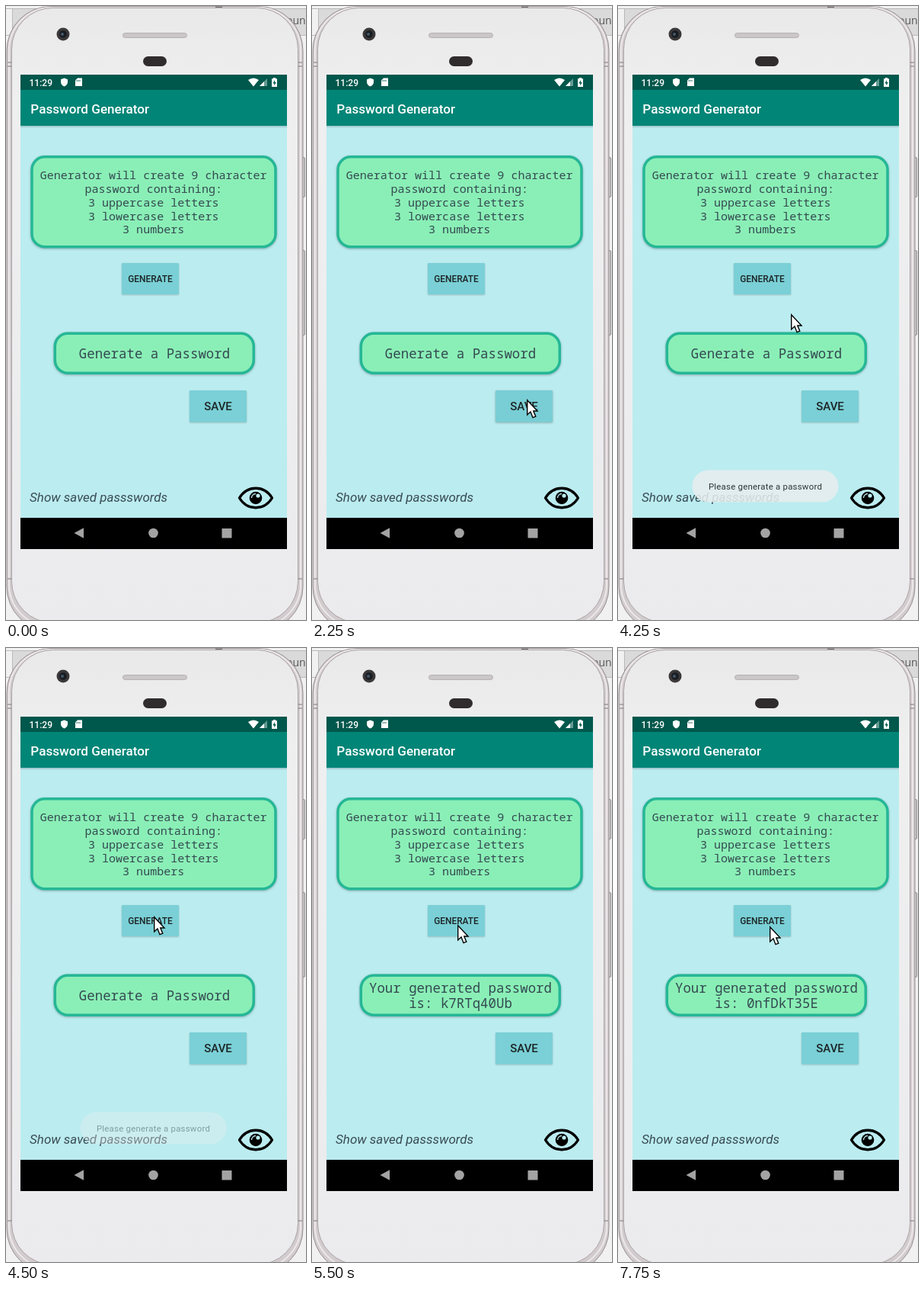
Animation of 394x805 px, one loop 8 s. Source, as an HTML page:

```html
<!DOCTYPE html>
<html lang="en">
<head>
<meta charset="utf-8">
<title>Password Generator</title>
<style>
  html, body { margin: 0; width: 100%; height: 100%; overflow: hidden; background: #f1f1f1; }
  svg { display: block; width: 394px; height: 805px; font-family: Roboto, sans-serif; }
  .mono { font-family: "Noto Sans Mono", monospace; text-anchor: middle; fill: #344a52; white-space: pre; }
  .info { font-size: 15.05px; }
  .result { font-size: 17.4px; }
  .panel { fill: #8aefb6; stroke: #25b796; stroke-width: 3.5; filter: drop-shadow(0 1px 1.5px #0004); }
  .button rect { fill: #7ad0d6; filter: drop-shadow(0 1px 1px #0003); }
  .button.pressed rect { fill: #78ced4; filter: drop-shadow(0 1px 1.5px #0004); }
  .button text { font-weight: 500; text-anchor: middle; fill: #1c2425; }
  #toast text { font-size: 11.4px; letter-spacing: .25px; text-anchor: middle; fill: #242829; }
</style>
</head>
<body>
<svg viewBox="0 0 394 805">
  <defs>
    <linearGradient id="body" x2="0" y2="1">
      <stop stop-color="#e9e9ea"/><stop offset=".15" stop-color="#efeff0"/><stop offset="1" stop-color="#ebebed"/>
    </linearGradient>
    <linearGradient id="barShadow" x2="0" y2="1">
      <stop stop-color="#000" stop-opacity=".2"/><stop offset="1" stop-color="#000" stop-opacity="0"/>
    </linearGradient>
  </defs>

  <!-- desktop behind the phone -->
  <path d="M8 3H394V38H8Z" fill="#dadada"/>
  <path d="M0 3.5H394M8.5 3V38M0 38.5H394" stroke="#b9b9b9" fill="none"/>
  <text x="368" y="24" font-size="14" fill="#555" font-family="Open Sans, sans-serif">oun</text>
  <g fill="#d0cccd" stroke="#8f8b8c">
    <rect x="387.5" y="198.5" width="5" height="52" rx="1.5"/>
    <rect x="387.5" y="320.5" width="5" height="111" rx="1.5"/>
  </g>

  <!-- phone -->
  <rect x="1" y=".5" width="389" height="819" rx="58" fill="#d2cbcd" stroke="#978f91"/>
  <rect x="4" y="2" width="383" height="812" rx="56" fill="none" stroke="#ece8e9" stroke-width="2"/>
  <rect x="7.5" y="2.5" width="376" height="806" rx="54" fill="url(#body)" stroke="#aaa2a4"/>
  <path d="M2 74H7M2 79H7M384 74H389M384 79H389M2 751H7M384 751H389M275 1.500H284" stroke="#7d7779"/>
  <circle cx="75" cy="37" r="8.500" fill="#3b3839"/>
  <circle cx="75" cy="37" r="4.800" fill="#191d22"/>
  <circle cx="74" cy="37" r="2" fill="#44586a"/>
  <rect x="153.500" y="35.500" width="84" height="6" rx="3" fill="#cbc7c9" stroke="#b5b0b2"/>
  <rect x="180" y="66" width="31" height="13" rx="6.500" fill="#302c2e"/>

  <!-- app screen -->
  <path d="M19 90H369V712H19Z" fill="#bbecf0"/>
  <path d="M19 157H369V160H19Z" fill="url(#barShadow)"/>
  <path d="M19 110H369V157H19Z" fill="#008577"/>
  <path d="M19 90H369V110H19Z" fill="#00574b"/>
  <g fill="#fff">
    <text x="30.500" y="104.500" font-size="12" font-weight="500">11:29</text>
    <path d="M76.500 94.500L81 96.200V99.500Q81 103.500 76.500 105.500Q72 103.500 72 99.500V96.200Z"/>
    <path d="M94 94.500H100V105H91V97.500Z"/>
    <path d="M318 97Q325 92 332 97L325 105.500Z"/>
    <path d="M333 105L343 95V105Z" opacity=".4"/>
    <path d="M333 105L339 99V105Z"/>
    <path d="M351 94H354V95.300H356V106H349V95.300H351Z"/>
    <path d="M353 97L350.500 101.500H352.300V104.500L354.800 100H353Z" fill="#00574b"/>
    <text x="32.300" y="140.500" font-size="17.100" font-weight="500">Password Generator</text>
  </g>
  <path d="M93 97V99M95 97V99M97 97V99" stroke="#00574b" stroke-width=".8"/>

  <rect class="panel" x="34" y="197.800" width="320" height="118" rx="17"/>
  <g id="info"></g>
  <rect class="panel" x="64.300" y="429.300" width="261" height="52" rx="17"/>
  <g id="result"></g>

  <g class="button" id="generate">
    <rect x="152" y="337" width="75" height="41" rx="1"/>
    <text x="189.500" y="361.500" font-size="11.900">GENERATE</text>
  </g>
  <g class="button" id="save">
    <rect x="241" y="504" width="75" height="41.500" rx="1"/>
    <text x="278.500" y="530.300" font-size="15">SAVE</text>
  </g>

  <text x="31" y="650" font-size="17" font-style="italic" fill="#3a4c54">Show saved passswords</text>
  <path d="M306.500 645C317 628 339 628 349.500 645C339 662 317 662 306.500 645Z" fill="none" stroke="#000" stroke-width="3.300" stroke-linejoin="round"/>
  <circle cx="328" cy="645" r="8.300"/>
  <path d="M322.500 645A5.500 5.500 0 0 1 328 639.500" fill="none" stroke="#bbecf0" stroke-width="1.300"/>
  <circle cx="331" cy="642" r="2.600" fill="#bbecf0"/>

  <g id="toast">
    <rect x="97.500" y="608.500" width="192" height="42" rx="21" fill="#e8eeef" fill-opacity=".93"/>
    <text x="193.500" y="634">Please generate a password</text>
  </g>

  <path d="M19 671H369V712H19Z"/>
  <g fill="#a3a3a3">
    <path d="M89.500 691L102 684.300V697.800Z"/>
    <circle cx="193.500" cy="691" r="6.300"/>
    <rect x="283.500" y="685" width="13" height="12.500" rx=".5"/>
  </g>

  <path id="cursor" d="M.7.7V20L5 16L8 23.700L11.800 22.200L8.800 15H14Z" fill="#fff" stroke="#000" stroke-width="1.400"/>
</svg>

<script>
const LOOP = 8000;
const el = id => document.getElementById(id);

// Each track holds [start time, value...] steps; a value lasts until the next step.
const cursorTrack = [
  [0], [500, 239, 701], [750, 288, 547], [1000, 282, 516], [4000, 290, 481],
  [4250, 227, 404], [4500, 194, 352], [4750, 191, 363], [7750, 199, 365]
];
const toastTrack = [
  [0, 0], [2500, .3], [2750, .75], [3000, 1], [4250, .93], [4500, .4], [4750, 0]
];
const yourPassword = "Your generated password";
const resultTrack = [
  [0, "Generate a Password"],
  [5250, yourPassword, "is: k7RTq40Ub"],
  [6500, yourPassword, "is: oM20Z7hJo"],
  [7500, yourPassword, "is: 0nfDkT35E"]
];
const generateClicks = [5250, 6500, 7500];
const saveClicks = [2250];

const valueAt = (track, t) => track.findLast(step => step[0] <= t).slice(1);
const isPressed = (clicks, t) => clicks.some(c => t >= c && t < c + 250);

function setLines(group, className, x, firstY, step, lines) {
  group.innerHTML = lines.map((line, i) =>
    `<text class="mono ${className}" x="${x}" y="${firstY + i * step}">${line}</text>`).join("");
}

setLines(el("info"), "info", 193.7, 227, 17.85, [
  "Generator will create 9 character",
  "password containing:",
  "3 uppercase letters",
  "3 lowercase letters",
  "3 numbers"
]);

let shownResult = "";

function draw(now) {
  const t = now % LOOP;

  const [x, y] = valueAt(cursorTrack, t);
  el("cursor").style.display = x === undefined ? "none" : "";
  if (x !== undefined) el("cursor").setAttribute("transform", `translate(${x} ${y})`);

  el("toast").style.opacity = valueAt(toastTrack, t)[0];
  el("generate").classList.toggle("pressed", isPressed(generateClicks, t));
  el("save").classList.toggle("pressed", isPressed(saveClicks, t));

  const lines = valueAt(resultTrack, t);
  if (lines.join() !== shownResult) {
    shownResult = lines.join();
    setLines(el("result"), "result", 195, lines.length > 1 ? 452 : 462, 20, lines);
  }
  requestAnimationFrame(draw);
}
draw(performance.now());
</script>
</body>
</html>
```
